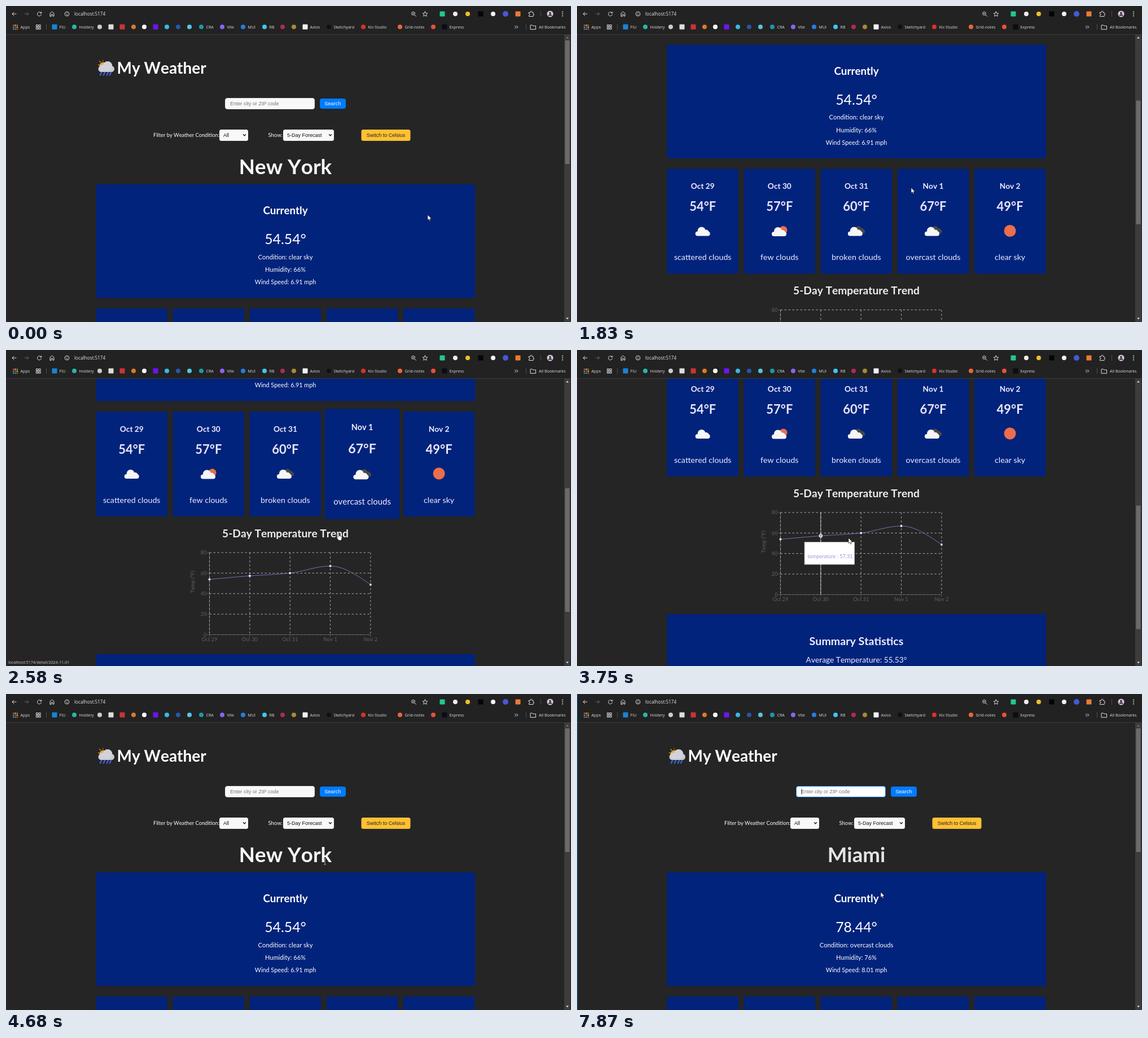
Recreate the animation shown at these times as an HTML page. Size 1001 by 560 pixels, loop 8000 ms.

```html
<!DOCTYPE html>
<html lang="en">
<head>
<meta charset="utf-8">
<title>My Weather</title>
<style>
  html, body { margin: 0; width: 100%; height: 100%; overflow: hidden; background: #252525; }
  svg { display: block; font-family: Lato, sans-serif; font-kerning: none; }
  .ui { font-family: "Open Sans", sans-serif; }
  .form { font-family: "Liberation Sans", Arial, sans-serif; }
  .bold { font-weight: 700; }
  .mid { text-anchor: middle; }
  .end { text-anchor: end; }
  .line { fill: none; stroke-linecap: round; stroke-linejoin: round; }
</style>
</head>
<body>
<svg width="1001" height="560" viewBox="0 0 1001 560">
  <g id="page"></g>
  <g id="toolbar"></g>
  <g id="overlay"></g>
</svg>
<script>
const LOOP = 8000;
const NAVY = '#02237c';
const byId = id => document.getElementById(id);

// The screen refreshes in short runs: [start, steps], 120 ms per step.
const ticks = [[0, 6], [750, 1], [900, 3], [1290, 3], [1680, 1], [1830, 2], [2100, 5], [2730, 1],
  [2880, 2], [3150, 10], [4380, 1], [4530, 1], [4680, 4], [5190, 2], [5460, 1], [5610, 1], [6040, 2],
  [6410, 1], [6560, 1], [6710, 1], [6990, 3], [7600, 2], [7870, 1]]
  .flatMap(([start, steps]) => Array.from({ length: steps }, (_, i) => start + i * 120));

const scrollKeys = [[750, 0], [1140, 135], [1290, 181], [1530, 230], [1680, 245], [1830, 247.5],
  [1950, 248], [2100, 256], [2340, 362], [2580, 427], [2730, 498], [3870, 498], [4230, 270],
  [4530, 40], [4680, 0]];
const hoverKeys = [[2100, 0], [2340, 1], [2730, 1], [3000, 0]];
const tooltipKeys = [[3630, 367.5], [3870, 438.7]];
const pointerKeys = [
  [0, 747, 370, 'arrow'], [600, 706, 357, 'arrow'], [750, 675, 345, 'arrow'], [1140, 600, 325, 'arrow'],
  [1290, 598, 323, 'arrow'], [1830, 592, 322, 'arrow'], [2220, 588, 324, 'hand'], [2880, 586, 325, 'arrow'],
  [3150, 580, 328, 'arrow'], [3390, 430, 350, 'arrow'], [3510, 375, 345, 'arrow'], [3630, 400, 338, 'arrow'],
  [3750, 481, 333, 'arrow'], [3870, 525, 325, 'arrow'], [4680, 565, 297, 'beam'], [4800, 545, 285, 'arrow'],
  [5040, 440, 228, 'arrow'], [5310, 414, 173, 'beam'], [6040, 414, 173, 'none'], [7600, 420, 178, 'beam'],
  [7720, 493, 199, 'arrow'], [7870, 538, 351, 'arrow']];
const typing = [[0, ''], [6040, 'M'], [6410, 'Mi'], [6560, 'Miam'], [6710, 'Miami'], [6990, '']];

const lastKey = (keys, t) => keys.findLast(key => key[0] <= t) || keys[0];

function interpolate(keys, t, column = 1) {
  const from = lastKey(keys, t);
  const to = keys[keys.indexOf(from) + 1];
  if (!to || t <= from[0]) return from[column];
  return from[column] + (to[column] - from[column]) * (t - from[0]) / (to[0] - from[0]);
}

const label = (x, y, text, size, cls = '', fill = '#fff', extra = '') =>
  `<text x="${x}" y="${y}" font-size="${size}" class="${cls}" fill="${fill}" ${extra}>${text}</text>`;
const box = (x, y, w, h, fill, r = 0, extra = '') =>
  `<rect x="${x}" y="${y}" width="${w}" height="${h}" rx="${r}" fill="${fill}" ${extra}/>`;
const disc = (x, y, r, fill, extra = '') => `<circle cx="${x}" cy="${y}" r="${r}" fill="${fill}" ${extra}/>`;
const line = (d, stroke = '#ddd', width = 1, extra = '') =>
  `<path d="${d}" class="line" stroke="${stroke}" stroke-width="${width}" ${extra}/>`;
const group = (transform, content) => `<g transform="${transform}">${content}</g>`;

/* Browser toolbar */

function drawToolbar() {
  const grey = '#ddd';
  const square = (x, y, fill) => box(x - 4.5, y - 4.5, 9, 9, fill, 1);
  const bookmarks = [
    [86, '#1684d8', 'FIU', 1], [121, '#2ab3ad', 'Holdery'], [166, '#ccc'], [186, '#ddd', '', 1],
    [206, '#cb3335', '', 1], [226, '#d97b28'], [245, '#fff'], [265, '#6f14f4', '', 1], [285, '#38b8e8'],
    [305, '#2857a8'], [325, '#58c4dc'], [346, '#1b98a8', 'CRA'], [383, '#8b63f0', 'Vite'],
    [420, '#1f7fe0', 'MUI'], [458, '#41c4ee', 'RB'], [490, '#b02a50'], [510, '#a88a3c'],
    [530, '#f3effb', 'Axios', 1], [572, '#101010', 'Sketchyard'], [633, '#d8322a', 'Kiv Studio'],
    [698, '#e8653a', 'Grid-notes'], [757, '#e8503a'], [777, '#0c0c14', 'Express', 1]];
  const appColours = ['#e8453c', '#f9bb2d', '#3aa757', '#4688f1'];

  let out = box(0, 0, 1001, 50, '#222') + box(0, 50, 1001, 1, '#3a3a3a');
  out += line('M18 14H11M14 11L11 14L14 17');
  out += line('M33 14H40M37 11L40 14L37 17', '#666');
  out += line('M62 12A3.6 3.6 0 1 0 62.6 15M62.8 10.5V12.6H60.6');
  out += line('M78 18V13L81.5 10L85 13V18H82.8V15H80.2V18Z');
  out += disc(108, 14, 3.8, 'none', `stroke="${grey}"`) + line('M108 14V16M108 12V12.1');
  out += label(121, 17.3, 'localhost:5174', 8.2, 'ui', '#e3e3e3');
  out += disc(721.5, 13.3, 2.9, 'none', `stroke="${grey}"`) + line('M723.7 15.6L726.5 18.4M720.3 13.3H722.7');
  out += line('M742.5 9.8L743.8 12.7L746.8 13L744.5 15.1L745.2 18.2L742.5 16.6L739.8 18.2L740.5 15.1L738.2 13L741.2 12.7Z');
  out += square(773, 14, '#20c98c') + disc(796, 14, 4, '#eee') + disc(818, 14, 4, '#f2bd2c');
  out += square(841, 14, '#050505') + disc(863, 14, 4, '#f4f4f4') + disc(885, 14, 5, '#4558d8') + square(907, 14, '#e87a35');
  out += line('M926.5 11.5H929V10.5A1.5 1.5 0 0 1 932 10.5V11.5H934V13.5A1.5 1.5 0 0 1 934 16.5V18.5H926.5V16.5A1.5 1.5 0 0 0 926.5 13.5Z');
  out += box(947, 9, 1, 10, '#4a4a55');
  out += disc(964, 14, 5.5, '#d8d0e8') + disc(964, 12.4, 2, '#4a3040') + `<path d="M960.5 17.5a3.5 3 0 0 1 7 0z" fill="#4a3040"/>`;
  out += [10.5, 14, 17.5].map(y => disc(986, y, 1, grey)).join('');

  for (let i = 0; i < 9; i++) out += box(12 + i % 3 * 3.4, 33 + Math.floor(i / 3) * 3.4, 2.3, 2.3, appColours[i % 4]);
  out += label(25.5, 40, 'Apps', 7.2, 'ui', grey);
  for (let i = 0; i < 4; i++) out += box(53.5 + i % 2 * 4.6, 33.5 + (i >> 1) * 4.6, 3, 3, 'none', 0, `stroke="${grey}"`);
  out += box(71, 32, 1, 10, '#4a4a55');
  for (const [x, fill, name = '', isSquare] of bookmarks) {
    out += isSquare ? square(x, 37, fill) : disc(x, 37, 4, fill);
    if (name) out += label(x + 8.5, 40, name, 7.1, 'ui', grey);
  }
  out += line('M901.5 35L903.7 37.3L901.5 39.6M904.7 35L906.9 37.3L904.7 39.6');
  out += box(921, 32, 1, 10, '#4a4a55') + line('M929 41V34H932.5L934 35.2H938.5V41Z');
  return out + label(944, 40, 'All Bookmarks', 7.1, 'ui', grey);
}

/* Weather icons */

const cloud = (x, y, fill = '#f6f6f6', scale = 1) => group(`translate(${x} ${y}) scale(${scale})`,
  box(-13, 0, 26, 8, fill, 4) + disc(-2, -1, 7, fill) + disc(6, 2, 5, fill));
const SUN = '#ec6e4c';
const icons = {
  scattered: cloud(0, 0),
  few: disc(6.7, -2.5, 7, SUN) + cloud(-.8, .5),
  broken: cloud(5, -3, '#484848', .8) + cloud(-2, 0),
  clear: disc(0, -1, 10.5, SUN),
};

function rainLogo() {
  const drops = [[169, 118], [175, 118], [181, 118], [186, 118]];
  return disc(172, 106, 6.5, '#f0a12c') + line('M163.5 104L165 105M166 98L167.5 99.5M172 97V97.5', '#f0a12c', 1.3) +
    box(163.5, 106, 28.5, 11, '#c9c9cf', 5.5) + disc(180, 106.5, 8.5, '#d2d2d8') + disc(171.5, 109.5, 6, '#d2d2d8') +
    drops.map(([x, y]) => line(`M${x} ${y}l-2.2 4.5`, '#3d62e0', 2.4)).join('');
}

/* Page */

const days = [
  ['Oct 29', 54, 'scattered', 'scattered clouds', 53.92],
  ['Oct 30', 57, 'few', 'few clouds', 57.31],
  ['Oct 31', 60, 'broken', 'broken clouds', 60.02],
  ['Nov 1', 67, 'broken', 'overcast clouds', 66.87],
  ['Nov 2', 49, 'clear', 'clear sky', 48.76]];
const cities = {
  newYork: ['New York', '54.54', 'clear sky', 66, '6.91'],
  miami: ['Miami', '78.44', 'overcast clouds', 76, '8.01'],
};

function drawForm(t) {
  const focused = t >= 5610;
  const value = lastKey(typing, t)[1];
  const caretX = 397.5 + [...value].reduce((w, c) => w + 9 * ({ M: .833, m: .833, a: .556, i: .222 })[c], 0);
  const chevron = x => line(`M${x - 2} 227.6L${x} 230L${x + 2} 227.6`, '#111', 1.3);
  let out = box(388.5, 163.5, 158, 19, focused ? '#fff' : '#f8f8f8', 3.5, `stroke="${focused ? '#1683f5' : '#e4e4e4'}"`);
  out += label(397, 176, value || 'Enter city or ZIP code', 9, 'form', value ? '#111' : '#757575');
  if (focused) out += box(caretX, 168, .8, 10, '#111');
  out += box(556, 164, 46, 18, '#007bff', 4) + label(578.7, 176, 'Search', 9.2, 'form mid');
  out += label(261, 231.7, 'Filter by Weather Condition:', 9.3) + label(464.5, 231.7, 'Show:', 9.4);
  out += box(378, 219, 51, 20, '#f8f8f8', 3.5) + label(385, 232, 'All', 9, 'form', '#111') + chevron(422.5);
  out += box(491, 219, 90, 20, '#f8f8f8', 3.5) + label(498, 232, '5-Day Forecast', 9, 'form', '#111') + chevron(574.5);
  return out + box(629.5, 219, 87, 20, '#ffc033', 3.5) + label(673, 232, 'Switch to Celsius', 9, 'form mid', '#222');
}

function drawCurrent([city, degrees, condition, humidity, wind], cityFill) {
  return label(495, 298, city, 36.7, 'bold mid', cityFill) + box(159.5, 316, 671.5, 201.5, NAVY, 2) +
    label(495, 369, 'Currently', 18.8, 'bold mid') + label(495, 422, degrees + '°', 24.8, 'mid') +
    label(495, 448.6, 'Condition: ' + condition, 11.2, 'mid') +
    label(495, 471, `Humidity: ${humidity}%`, 11, 'mid') +
    label(495, 493, `Wind Speed: ${wind} mph`, 10.8, 'mid');
}

function drawCard([date, degrees, icon, condition], i, hover) {
  const x = 222.7 + i * 136.1, y = 629, scale = i === 3 ? 1 + .05 * hover : 1;
  return group(`translate(${x} ${y}) scale(${scale})`,
    box(-63.3, -93, 126.6, 186, NAVY, 4) + label(0, -57.5, date, 13.7, 'bold mid', '#eef') +
    label(0, -18.5, degrees + '°F', 22, 'bold mid', '#e6e6f6') +
    group('translate(0 18)', icons[icon]) + label(0, 68.5, condition, 14.2, 'mid', '#eef'));
}

const chartX = i => 360.5 + i * 71.35;
const chartY = degrees => 931.5 - degrees * 1.819;

// Monotone cubic through the daily temperatures.
function trendPath() {
  const ys = days.map(day => chartY(day[4])), dx = chartX(1) - chartX(0);
  const slopes = ys.slice(1).map((y, i) => (y - ys[i]) / dx);
  const tangents = ys.map((_, i) => {
    const a = slopes[i - 1], b = slopes[i];
    return (Math.sign(a) + Math.sign(b)) * Math.min(Math.abs(a), Math.abs(b), Math.abs(a + b) / 4);
  });
  tangents[0] = (3 * slopes[0] - tangents[1]) / 2;
  tangents[4] = (3 * slopes[3] - tangents[3]) / 2;
  return ys.slice(1).reduce((d, y, i) => d + `C${chartX(i) + dx / 3} ${ys[i] + tangents[i] * dx / 3} ` +
    `${chartX(i + 1) - dx / 3} ${y - tangents[i + 1] * dx / 3} ${chartX(i + 1)} ${y}`, `M${chartX(0)} ${ys[0]}`);
}

function drawChart(t, tooltipY) {
  const dim = '#606060', dash = 'stroke-dasharray="3.5 3.5" style="stroke-linecap:butt"';
  const top = chartY(80), bottom = chartY(0), left = chartX(0), right = chartX(4);
  let out = label(495, 758.5, '5-Day Temperature Trend', 19.2, 'bold mid', '#eee');
  for (const value of [0, 20, 40, 60, 80]) {
    const y = chartY(value);
    out += line(`M${left} ${y}H${right}`, '#ccc', .8, dash) + line(`M${left - 4} ${y}H${left}`, dim, .8);
    out += label(left - 5, y + 3.3, value, 9.2, 'end', dim);
  }
  out += line(`M${left} ${top}V${bottom}H${right}`, '#666', .8);
  days.forEach(([date], i) => {
    out += line(`M${chartX(i)} ${top}V${bottom}`, '#ccc', .8, dash) + line(`M${chartX(i)} ${bottom}v4`, dim, .8);
    out += label(chartX(i), bottom + 11, date, 9.2, 'mid', dim);
  });
  out += label(0, 0, 'Temp (°F)', 9.2, 'mid', dim, 'transform="translate(334 838) rotate(-90)"');

  const active = t >= 3390 && t < 3990 ? (t < 3750 ? 0 : 1) : -1;
  if (active >= 0) out += line(`M${chartX(active)} ${top}V${bottom}`, '#ccc', .9);
  out += line(trendPath(), '#8884d8', .8);
  days.forEach((day, i) => {
    out += i === active
      ? disc(chartX(i), chartY(day[4]), 2.6, '#8884d8', 'stroke="#fff" stroke-width="1.2"')
      : disc(chartX(i), chartY(day[4]), 1.9, '#fff', 'stroke="#8884d8" stroke-width=".6"');
  });
  if (active >= 0) {
    const x = interpolate(tooltipKeys, t);
    out += box(x, tooltipY, 88.5, 39.5, '#fff', 0, 'stroke="#ccc" stroke-width=".7"');
    out += label(x + 5.5, tooltipY + 28.5, 'temperature : ' + days[active][4], 9.1, '', '#9a96e0');
  }
  return out;
}

function drawSummary() {
  return box(159.5, 966, 671.5, 200, NAVY, 2) + label(495, 1020.5, 'Summary Statistics', 19.6, 'bold mid', '#eef') +
    label(495, 1051.5, 'Average Temperature: 55.53°', 13.7, 'mid', '#eef');
}

/* Scrollbar, status line and pointer */

function drawScrollbar(scroll) {
  return box(989, 51, 11, 509, '#3c3c3c') + box(990.5, 61 + scroll * .431, 8, 219, '#6b6b6b') +
    `<path d="M992 57.5h5l-2.5-3z" fill="${scroll ? '#ddd' : '#777'}"/><path d="M992 552.5h5l-2.5 3z" fill="#ddd"/>`;
}

const pointers = {
  arrow: '<path d="M0 0V9.6L2.2 7.6L3.7 11L5.3 10.3L3.8 7H6.8Z" fill="#fff" stroke="#000" stroke-width=".6"/>',
  hand: '<path d="M1.5 7V1.2a1 1 0 0 1 2 0V5l4 .8q1 .3 .9 1.5l-.6 3.4-.8 2.3H2.8L-.8 8.6q-.3-1.2 1-1z" fill="#fff" stroke="#000" stroke-width=".6"/>',
  beam: '<path d="M-2 -5H2M0 -5V5M-2 5H2" stroke="#ccc" fill="none" style="mix-blend-mode:difference"/>',
  none: '',
};

function render(t) {
  const scroll = interpolate(scrollKeys, t);
  const hover = interpolate(hoverKeys, t);
  const x = interpolate(pointerKeys, t, 1), y = interpolate(pointerKeys, t, 2);
  const arrived = t >= 7110;
  const cards = days.map((day, i) => drawCard(day, i, hover)).join('');

  byId('page').innerHTML = box(0, 0, 1001, 560, '#252525') + group(`translate(0 ${-scroll})`,
    rainLogo() + label(196.5, 119.5, 'My Weather', 28, 'bold') + drawForm(t) +
    drawCurrent(arrived ? cities.miami : cities.newYork, arrived || scroll ? '#e4e4e4' : '#fafafa') +
    cards + drawChart(t, y + 7.5 + scroll) + drawSummary());

  const status = t >= 2220 && t < 3000 ? label(4, 556, 'localhost:5174/detail/2024-11-01', 7.1, 'ui', '#ccc') : '';
  byId('overlay').innerHTML = drawScrollbar(scroll) + status +
    (t >= 5460 ? box(0, 0, 1, 560, '#1464a0') : box(0, 51, 1, 509, '#28283c')) +
    group(`translate(${x} ${y})`, pointers[lastKey(pointerKeys, t)[3]]);
}

byId('toolbar').innerHTML = drawToolbar();
let shown = -1;
function play() {
  const now = performance.now() % LOOP;
  const tick = ticks.findLast(time => time <= now);
  if (tick !== shown) render(shown = tick);
  requestAnimationFrame(play);
}
play();
</script>
</body>
</html>
```
